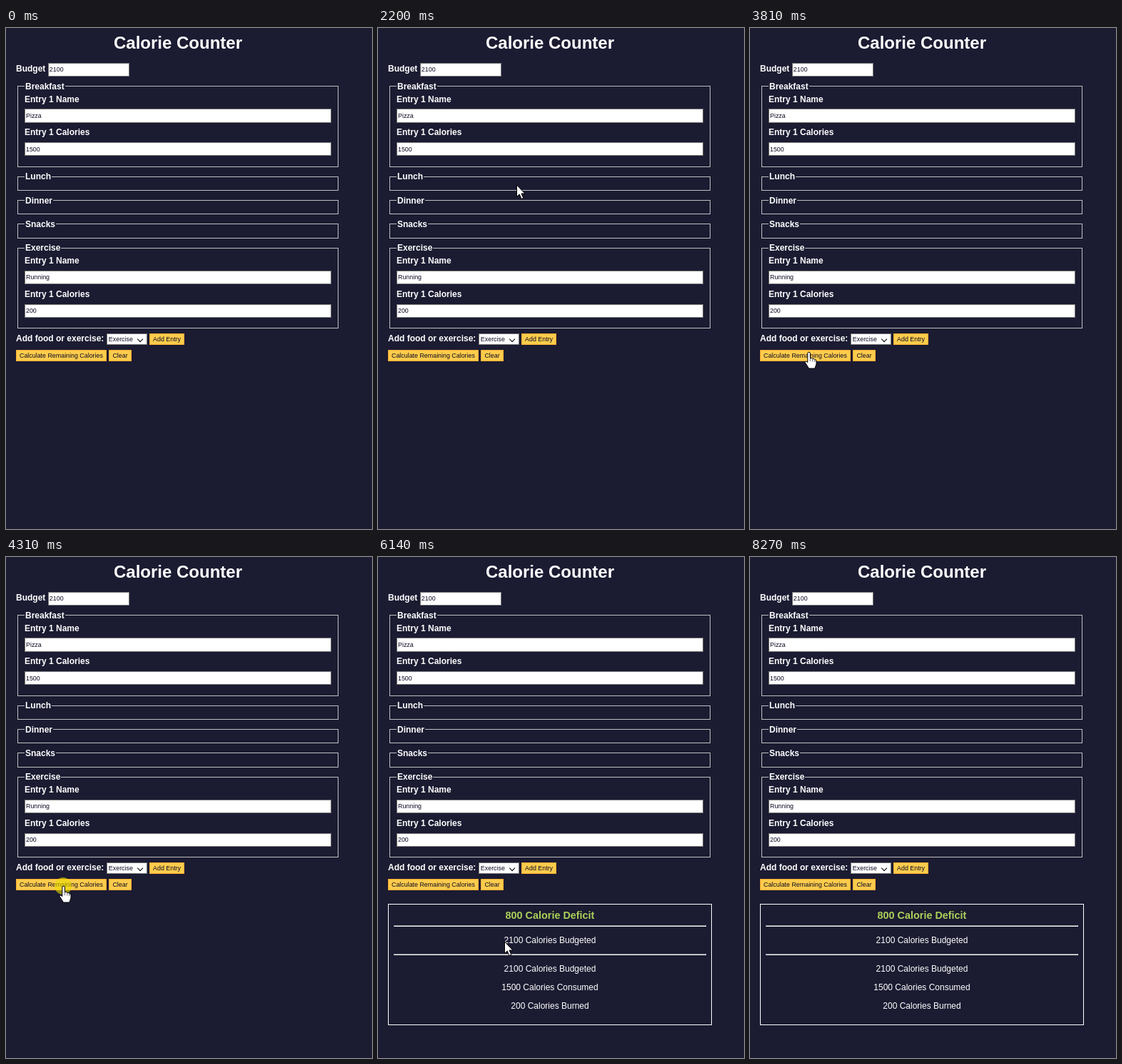
Animation of 513 by 702 pixels, one loop 8980 ms. Source, as an HTML page:

```html
<!DOCTYPE html>
<html lang="en">
<head>
<meta charset="utf-8">
<title>Calorie Counter</title>
<style>
  * { box-sizing: border-box; }
  html, body { margin: 0; width: 100%; height: 100%; overflow: hidden; background: #1b1b32; }
  body { position: relative; color: #fff; font: 12px/14px "Liberation Sans", Arial, sans-serif; }
  main { position: absolute; left: 14px; top: 0; width: 454px; }
  h1 { margin: 7px 0 0; font-size: 24px; line-height: 27px; text-align: center; }
  label, .meal > b { font-weight: bold; white-space: nowrap; }

  .row { position: absolute; left: 0; display: flex; gap: 3.5px; align-items: baseline; }
  .field, .select, .button { font-size: 8.89px; line-height: 10px; color: #0a0a23; white-space: nowrap; }
  .field { height: 19.25px; padding: 3.6px 1px 0; background: #fff; border: 1px solid #767676; }
  .button { height: 16px; padding: 2px 4px; background: #fecc4c; border: 1px solid #feac32; }
  .select { position: relative; width: 56.7px; height: 16px; padding: 2px; background: #fff; border: 1px solid #767676; }
  .select::after {
    content: ""; position: absolute; right: 5px; top: 3.5px; width: 5.2px; height: 5.2px;
    border: solid #000; border-width: 0 1.7px 1.7px 0; transform: rotate(45deg);
  }

  .meals { position: absolute; left: 2px; top: 81.1px; width: 450px; }
  .meal { position: relative; margin-bottom: 12.97px; padding: 10.6px 9px 7.76px; border: 1px solid #c0c0c0; }
  .meal > b { position: absolute; left: 9px; top: -7.5px; padding: 0 1px; background: #1b1b32; }
  .meal label { display: block; }
  .meal .field { margin: 6.6px 0 6.82px; }

  #result { position: absolute; top: 486px; width: 100%; padding: 7px; border: 1px solid #fff; text-align: center; }
  #result h2 { margin: 0 0 6px; font-size: 14.4px; line-height: 16px; color: #acd157; }
  #result hr { margin: 0; }
  #result p { margin: 12px 0; }

  #overlay { position: absolute; left: 0; top: 0; pointer-events: none; }
  #pointer { fill: #fff; stroke: #000; stroke-linejoin: round; }
</style>
</head>
<body>
<main>
  <h1>Calorie Counter</h1>
  <div class="row" style="top: 48.75px">
    <label>Budget</label><div class="field" style="width: 114px">2100</div>
  </div>

  <div class="meals">
    <div class="meal"><b>Breakfast</b>
      <label>Entry 1 Name</label><div class="field">Pizza</div>
      <label>Entry 1 Calories</label><div class="field">1500</div>
    </div>
    <div class="meal"><b>Lunch</b></div>
    <div class="meal"><b>Dinner</b></div>
    <div class="meal"><b>Snacks</b></div>
    <div class="meal"><b>Exercise</b>
      <label>Entry 1 Name</label><div class="field">Running</div>
      <label>Entry 1 Calories</label><div class="field">200</div>
    </div>
  </div>

  <div class="row" style="top: 428px">
    <label>Add food or exercise:</label>
    <div class="select">Exercise</div>
    <div class="button">Add Entry</div>
  </div>
  <div class="row" style="top: 451px">
    <div class="button">Calculate Remaining Calories</div>
    <div class="button">Clear</div>
  </div>

  <div id="result">
    <h2>800 Calorie Deficit</h2>
    <hr>
    <p>2100 Calories Budgeted</p>
    <hr>
    <p>2100 Calories Budgeted</p>
    <p>1500 Calories Consumed</p>
    <p>200 Calories Burned</p>
  </div>
</main>

<svg id="overlay" width="513" height="702">
  <circle id="click" cx="80" cy="461" r="12" fill="#e8dc00" opacity=".6"/>
  <g id="pointer">
    <path id="arrow" d="M.5 0V16.5L4.2 13 7 19.5 9.8 18.3 7 12H12Z"/>
    <g id="hand">
      <path d="M-1.2 2a1.8 1.8 0 0 1 3.6 0V8.6q2.9-.6 3.4 1 2.4-.6 2.9.9 2.4-.2 2.3 2.4V17L8.8 23H.4L-1.6 19.5-5 14.2q.6-2.6 3.8.4Z"/>
      <path d="M2.4 9v4M5.8 10v3.5M8.7 11v3" stroke-width=".6"/>
    </g>
    <path id="beam" d="M-3-7.5H3M0-7.5V7.5M-3 7.5H3" fill="none"/>
  </g>
</svg>

<script>
  const LOOP = 8980, START = 672, STEP = 100.8;
  const $ = id => document.getElementById(id);
  const show = (id, on) => { $(id).style.display = on ? '' : 'none'; };

  // step, x, y, steps of rest
  const stops = [
    [0, 375, 448], [5, 160, 133], [7, 165, 123], [11, 175, 169, 3],
    [15, 194, 220], [19, 213, 365, 1], [23, 218, 447], [26, 180, 487],
    [30, 83, 451], [33, 80, 461, 7], [44, 123, 514], [46, 204, 514, 3],
    [53, 163, 538], [58, 234, 545], [60, 252, 545, 1], [63, 195, 569],
    [65, 118, 606, 1], [75, 415, 705]
  ];

  function pointerAt(step) {
    const next = Math.max(1, stops.findIndex(s => s[0] >= step));
    const [k0, x0, y0, rest = 0] = stops[next - 1];
    const [k1, x1, y1] = stops[next];
    const u = Math.max(0, (step - k0 - rest) / (k1 - k0 - rest));
    return [x0 + (x1 - x0) * u, y0 + (y1 - y0) * u].map(Math.round);
  }

  function shapeAt(x, y) {
    const el = document.elementFromPoint(x, y);
    return el?.matches('.field') ? 'beam' : el?.matches('.button') ? 'hand' : 'arrow';
  }

  function draw(t) {
    const step = Math.floor((t - START) / STEP);
    show('click', step === 35 || step === 36);
    show('result', step >= 37);

    const visible = step >= 0 && step < 75;
    show('pointer', visible);
    if (!visible) return;
    const [x, y] = pointerAt(step);
    const shape = shapeAt(x, y);
    for (const id of ['arrow', 'hand', 'beam']) show(id, id === shape);
    $('pointer').setAttribute('transform', `translate(${x} ${y})`);
  }

  let begin;
  function tick(now) {
    begin ??= now;
    draw((now - begin) % LOOP);
    requestAnimationFrame(tick);
  }
  draw(0);
  requestAnimationFrame(tick);
</script>
</body>
</html>
```
